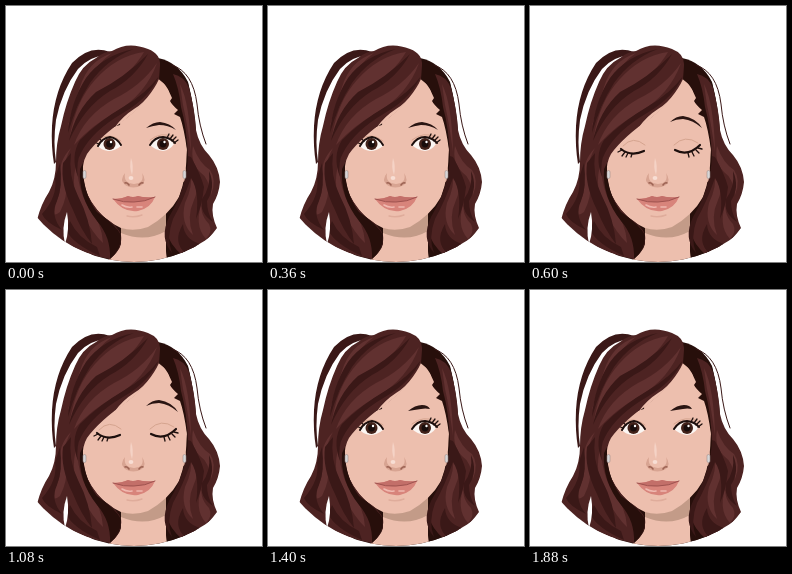
An HTML page for the animation above (2.2 s loop, 256x256 px).

```html
<!DOCTYPE html>
<html lang="en">
<head>
<meta charset="utf-8">
<title>Blinking portrait</title>
<style>
html, body { margin: 0; width: 100%; height: 100%; overflow: hidden; background: #fff; }
svg { display: block; width: 100vw; height: 100vh; }
.line { fill: none; stroke-linecap: round; stroke-linejoin: round; }
.deep { fill: #270f0b; }
.dark { fill: #3a1817; }
.mid { fill: #4d2322; }
.light { fill: #613130; }
.skin { fill: #edbfae; }
.gap { fill: #fff; }
.strand { stroke: #3a1817; }
.lash { stroke: #1d0f0d; }
</style>
</head>
<body>
<svg viewBox="0 0 256 256">
<defs>
  <clipPath id="disc"><circle cx="128" cy="128" r="128"/></clipPath>
  <clipPath id="whiteL"><path d="M92 140 Q96 132 104 131 Q111 132 115 140 Q109 145 102 145 Q95 144 92 140Z"/></clipPath>
  <clipPath id="whiteR"><path d="M144 139 Q149 131 157 131 Q164 132 168 138 Q164 144 157 145 Q149 144 144 139Z"/></clipPath>
</defs>
<rect width="256" height="256" fill="#fff"/>
<g clip-path="url(#disc)">
  <!-- back hair and loose strands -->
  <path class="deep" d="M86 60 L152 52 Q172 56 182 76 Q188 100 190 124 L190 250 L160 257 L90 257 L70 220Z"/>
  <path class="dark" d="M104 46 Q84 38 66 57 Q48 84 46 120 Q45 140 48 158 L50 156 Q47 136 50 114 Q56 84 72 63 Q84 50 98 50Z"/>
  <path class="line strand" d="M166 59 Q187 66 191 98 Q193 120 200 138" stroke-width="1"/>

  <!-- neck -->
  <path class="skin" d="M115 212 L115 238 Q113 246 103 253 L103 257 L161 257 L160 240 L160 206Z"/>
  <path d="M115 216 L160 207 L160 225 Q139 237 115 227Z" fill="#c39b88"/>

  <!-- ears and face -->
  <path d="M79 157 Q74 162 78 175 L83 178 V157Z M176 157 Q182 161 179 175 L173 178Z" fill="#d9a895"/>
  <path class="skin" d="M77 150 Q75 173 82 190 Q93 212 115 222 Q128 226 142 221 Q163 209 173 191 Q181 170 181 142 Q178 99 152 70 L120 86 L78 138Z"/>

  <!-- nose -->
  <path d="M119 167 Q113 174 119 179 Q127 184 136 179 Q141 174 136 167 Q139 177 128 178 Q117 177 119 167Z" fill="#d8a492"/>
  <path class="line" d="M119 177 Q121 176 123 179 M133 179 Q135 176 137 177" stroke="#9c6253" stroke-width="1.6"/>
  <path d="M125 152 Q128 160 126 169 Q123 161 125 152Z" fill="#f5d3c6"/>
  <ellipse cx="125" cy="172" rx="2.4" ry="2" fill="#f8ded4"/>

  <!-- mouth -->
  <path d="M107 193 Q116 193 122 190 Q127 192 132 190 Q139 193 149 191 Q145 202 132 205 Q117 207 107 193Z" fill="#d8847b"/>
  <path d="M107 193 Q116 193 122 190 Q127 192 132 190 Q139 192 149 191 Q138 196 128 196 Q117 197 107 193Z" fill="#c36f69"/>
  <path class="line" d="M107 193 Q118 197 128 196 Q139 196 149 191" stroke="#9a504c" stroke-width=".9"/>
  <path class="line" d="M116 199 Q121 202 126 201 M131 201 H136" stroke="#f0b9b0" stroke-width="1.6"/>
  <path class="line" d="M121 210 Q128 212 136 209" stroke="#dfac9b" stroke-width="1.4"/>

  <!-- eyes -->
  <g id="open">
    <path class="line" d="M92 134 Q103 125 115 135 M144 134 Q155 125 168 131" stroke="#d5a48f" stroke-width="1"/>
    <g clip-path="url(#whiteL)">
      <rect x="89" y="130" width="27" height="17" fill="#fbf6f3"/>
      <circle cx="103.5" cy="138" r="6" fill="#42221a"/>
      <circle cx="103.5" cy="138" r="3.4" fill="#180d0c"/>
      <circle cx="105" cy="136" r="1.2" fill="#fff"/>
    </g>
    <g clip-path="url(#whiteR)">
      <rect x="143" y="130" width="27" height="17" fill="#fbf6f3"/>
      <circle cx="157" cy="138" r="6" fill="#42221a"/>
      <circle cx="157" cy="138" r="3.4" fill="#180d0c"/>
      <circle cx="158.500" cy="136" r="1.2" fill="#fff"/>
    </g>
    <g class="line lash">
      <path d="M92 140 Q96 132 104 131 Q111 132 115 139 M144 139 Q149 131 157 131 Q165 132 169 137" stroke-width="2"/>
      <path d="M93 138 L88 136 M96 135 L91 131 M161 132 L163 128 M164 133 L167 129 M166 135 L170 131 M168 137 L172 134" stroke-width="1.3"/>
    </g>
  </g>
  <g id="closed">
    <path class="line" d="M93 140 Q103 129 115 139 M144 139 Q155 128 168 137" stroke="#d5a48f" stroke-width="1"/>
    <g class="line lash">
      <path d="M91 143 Q101 151 114 145 M145 144 Q158 151 170 139" stroke-width="2.2"/>
      <path d="M92 144 L88 146 M95 146 L92 150 M98 147 L96 151 M102 148 L101 151 M158 147 L159 151 M162 146 L164 150 M166 144 L169 147 M168 142 L172 143" stroke-width="1.3"/>
    </g>
  </g>
  <path id="browL" class="line" d="M101 124 Q107 119 113 118" stroke="#2a1512" stroke-width="2.4"/>
  <path id="browR" fill="#2a1512"/>

  <!-- right hair -->
  <path class="deep" d="M150 71 L152 55 Q172 58 182 77 Q188 100 189 124 L183 160 Q182 180 174 194 Q166 207 160 219 L160 245 L162 257 L180 250 V170 L181 144 Q178 122 174 111 L168 108 L172 104 Q166 99 164 95 L166 92 Q163 86 161 80Z"/>
  <path class="mid" d="M167 68 Q178 70 183 82 Q189 104 190 124 Q193 139 203 149 Q213 161 214 176 Q213 188 207 198 Q205 209 211 222 Q195 244 176 249 Q164 239 160 225 Q164 209 175 194 Q183 178 182 152 Q181 122 175 101 Q173 82 167 68Z"/>
  <g class="light">
    <path d="M174 78 Q184 98 185 146 Q181 116 177 99Z"/>
    <path d="M187 140 Q193 157 204 164 Q211 174 205 189 Q203 172 194 166 Q184 156 187 140Z"/>
    <path d="M185 164 Q195 179 188 194 Q180 211 187 229 Q174 217 179 197 Q187 181 185 164Z"/>
    <path d="M197 193 Q192 207 203 218 Q207 226 200 233 Q187 219 197 193Z"/>
  </g>
  <g class="dark">
    <path d="M185 151 Q195 169 198 181 Q196 200 190 213 Q194 186 185 172 Q177 195 167 213 Q160 232 166 247 Q153 232 163 211 Q181 181 182 150Z"/>
    <path d="M203 165 Q210 181 201 195 Q201 207 207 216 Q193 207 196 193 Q205 181 203 165Z"/>
    <path d="M177 218 Q178 233 194 238 L180 248 Q166 236 177 218Z"/>
  </g>

  <!-- left hair and fringe -->
  <path class="mid" d="M153 73 Q145 91 122 111 Q93 131 81 148 Q75 158 77 177 Q83 197 98 211 Q112 220 115 229 Q117 242 104 253 Q62 246 31 214 Q35 198 43 186 Q50 173 50 156 Q50 137 55 120 Q60 96 69 76 Q76 59 90 52 Q99 45 106 45 Q122 35 142 43 Q155 48 154 60Z"/>
  <g class="light">
    <path d="M138 46 Q110 50 89 74 Q70 95 64 130 Q78 102 98 85 Q126 67 138 46Z"/>
    <path d="M151 57 Q135 80 108 93 Q78 110 68 139 Q86 119 110 106 Q140 88 151 57Z"/>
    <path d="M106 47 Q82 55 74 81 Q66 103 62 120 Q76 91 84 74 Q91 57 106 47Z"/>
    <path d="M65 142 Q55 159 60 178 Q62 190 54 206 Q48 211 44 207 Q56 190 54 174 Q52 155 65 142Z"/>
    <path d="M71 156 Q71 183 83 202 Q96 217 97 237 Q87 228 76 207 Q63 181 71 156Z"/>
  </g>
  <g class="dark">
    <path d="M142 48 Q129 72 104 85 Q78 101 63 135 Q69 105 90 86 Q118 72 142 48Z"/>
    <path d="M128 43 Q101 53 84 77 Q70 99 62 127 Q64 97 80 72 Q97 49 128 43Z"/>
    <path d="M153 70 Q143 92 117 107 Q86 125 75 147 Q70 155 72 171 Q64 150 74 134 Q93 115 117 101 Q141 87 153 70Z"/>
    <path d="M65 147 Q62 170 72 190 Q84 213 86 238 Q75 224 67 204 Q54 178 57 157Z"/>
    <path d="M54 157 Q57 181 51 195 Q44 210 56 224 Q39 216 36 208 Q52 190 49 172Z"/>
    <path d="M64 215 Q72 232 91 241 L94 250 Q67 238 60 224Z"/>
  </g>
  <path class="deep" d="M77 157 Q76 186 91 206 Q110 219 115 229 Q116 243 104 253 Q105 231 91 215 Q72 191 74 163Z"/>
  <path class="skin" d="M145 87 Q134 104 109 121 Q117 110 128 103 Q138 97 145 87Z"/>
  <path class="gap" d="M61 206 Q55 222 59 238 Q64 224 61 206Z"/>

  <!-- earrings -->
  <g fill="#d9d5d6" stroke="#8e8582" stroke-width=".5">
    <rect x="77" y="164.500" width="3" height="8" rx="1.5"/>
    <rect x="177" y="164.500" width="3" height="8" rx="1.5"/>
  </g>
</g>
</svg>
<script>
const LOOP = 2200, SHUT = 600, REOPEN = 1400;
const BROW = {
  relaxed: "M140 122 Q147 116 154 116 Q164 117 170 124 Q162 119 153 119 Q146 120 140 122Z",
  raised: "M140 116 Q146 110 153 110 Q166 112 172 122 Q163 114 153 113 Q146 113 140 116Z",
  settled: "M140 121 Q147 115 154 115 Q160 115 162 119 Q157 118 153 119 Q146 120 140 121Z"
};
const el = id => document.getElementById(id);
const show = (id, on) => el(id).setAttribute("visibility", on ? "visible" : "hidden");

function draw(t) {
  const shut = t >= SHUT && t < REOPEN;
  show("open", !shut);
  show("closed", shut);
  show("browL", !shut);
  el("browR").setAttribute("d", shut ? BROW.raised : t < SHUT ? BROW.relaxed : BROW.settled);
}

const start = performance.now();
function tick() {
  draw((performance.now() - start) % LOOP);
  requestAnimationFrame(tick);
}
tick();
</script>
</body>
</html>
```
